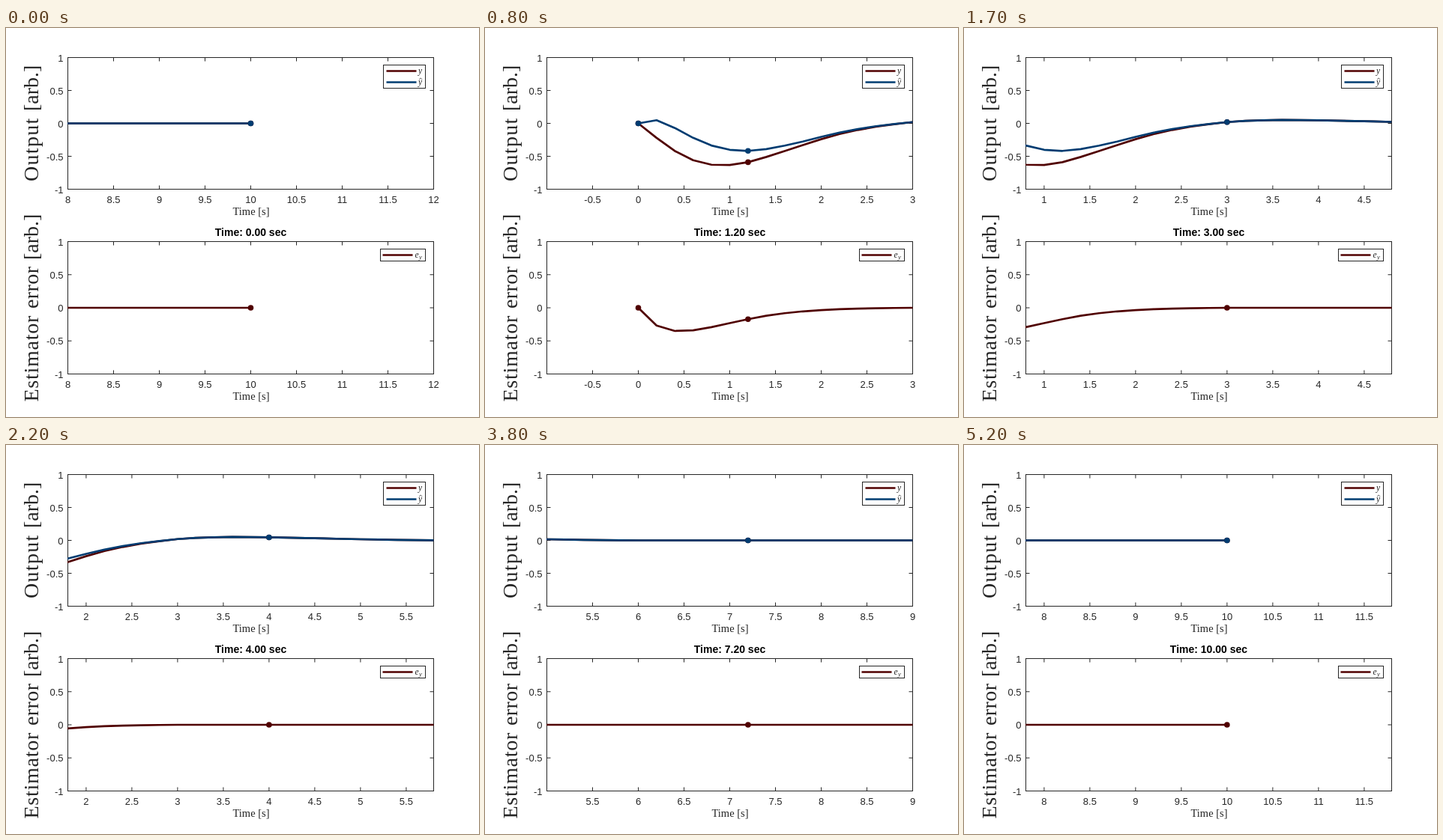
An HTML page that plays this animation: 631x520 px, repeating every 5.3 s.

```html
<!DOCTYPE html>
<html lang="en">
<head>
<meta charset="utf-8">
<title>Estimator response</title>
<style>
html, body { margin: 0; width: 100%; height: 100%; overflow: hidden; background: #fff; }
svg { display: block; width: 631px; height: 520px; }
.tick { font: 13px "Liberation Sans", Arial, sans-serif; fill: #262626; }
.title { font: bold 14px "Liberation Sans", Arial, sans-serif; fill: #000; }
.tex { font-family: "Liberation Serif", "Times New Roman", serif; fill: #262626; }
.var { font-style: italic; font-size: 11.5px; }
.axis { fill: none; stroke: #262626; stroke-width: 1; }
.curve { fill: none; stroke-width: 2.7; stroke-linejoin: round; }
</style>
</head>
<body>
<svg id="stage" viewBox="0 0 631 520"></svg>
<script>
const RED = '#500000', BLUE = '#003c71';
const LEFT = 82.5, RIGHT = 570.5, SPAN = 4, DT = 0.2, END = 10;
const STEP_MS = 100, STEPS = 53;
const stage = document.getElementById('stage');

function add(parent, tag, attrs, text) {
  const el = document.createElementNS('http://www.w3.org/2000/svg', tag);
  for (const k in attrs) el.setAttribute(k, attrs[k]);
  if (text !== undefined) el.textContent = text;
  parent.appendChild(el);
  return el;
}

// Sampled signals, one value per DT; zero afterwards
const out = [0, -.22, -.42, -.56, -.628, -.633, -.59, -.51, -.42, -.33, -.24, -.162, -.1, -.05, -.012,
  .02, .038, .048, .052, .05, .046, .041, .035, .029, .023, .017, .012, .008, .005, .002];
const err = [0, -.268, -.35, -.34, -.292, -.232, -.172, -.12, -.082, -.054, -.035, -.022, -.013, -.007, -.003];
const at = (list, i) => list[i] || 0;
const y = i => at(out, i);
const e = i => at(err, i);
const yHat = i => y(i) - e(i);

const defs = add(stage, 'defs', {});

function makePlot(top, bottom, signals, id) {
  const mid = (top + bottom) / 2, unit = (bottom - top) / 2;
  const clip = add(defs, 'clipPath', { id });
  add(clip, 'rect', { x: LEFT - .5, y: top, width: RIGHT - LEFT + .5, height: bottom - top });
  add(stage, 'rect', { class: 'axis', x: LEFT, y: top, width: RIGHT - LEFT, height: bottom - top });
  let d = '';
  for (let v = -1; v <= 1; v += .5) {
    const py = mid - v * unit;
    d += `M${LEFT} ${py}h5M${RIGHT} ${py}h-5`;
    add(stage, 'text', { class: 'tick', x: 76.5, y: py + 5, 'text-anchor': 'end' }, v);
  }
  add(stage, 'path', { class: 'axis', d });
  add(stage, 'text', { class: 'tex', x: 327, y: bottom + 34.5, 'font-size': 14.5, 'text-anchor': 'middle' }, 'Time [s]');
  const ticks = add(stage, 'path', { class: 'axis' });
  const labels = Array.from({ length: 9 }, () =>
    add(stage, 'text', { class: 'tick', y: bottom + 18.5, 'text-anchor': 'middle' }));
  const curves = signals.map(s =>
    add(stage, 'path', { class: 'curve', stroke: s.color, 'clip-path': `url(#${id})` }));
  const dots = signals.map(s => [0, 1].map(() => add(stage, 'circle', { r: 3.8, fill: s.color })));

  return function update(center, now) {
    const lo = center - SPAN / 2;
    const px = t => LEFT + (t - lo) * (RIGHT - LEFT) / SPAN;
    const first = Math.ceil(lo * 2 - 1e-6) / 2;
    const showFirst = first - lo > 1e-6 || [0, 2, 10].includes(Math.round(center * 10) / 10);
    let marks = '';
    labels.forEach((label, i) => {
      const t = first + i / 2;
      const on = t <= lo + SPAN + 1e-6 && (i > 0 || showFirst);
      label.textContent = on ? String(t + 0) : '';
      if (!on) return;
      label.setAttribute('x', px(t));
      marks += `M${px(t)} ${top}v5M${px(t)} ${bottom}v-5`;
    });
    ticks.setAttribute('d', marks);
    signals.forEach((s, k) => {
      const pts = [];
      for (let i = 0; i <= END / DT; i++) {
        pts.push(px(i * DT).toFixed(2) + ' ' + (mid - s.f(i) * unit).toFixed(2));
      }
      curves[k].setAttribute('d', 'M' + pts.join('L'));
      [0, now].forEach((t, j) => {
        const dot = dots[k][j], x = px(t);
        const seen = x > LEFT - .1 && x < RIGHT + .1;
        dot.setAttribute('visibility', seen ? 'visible' : 'hidden');
        dot.setAttribute('cx', x);
        dot.setAttribute('cy', mid - s.f(Math.round(t / DT)) * unit);
      });
    });
  };
}

const plots = [
  makePlot(39.5, 215.5, [{ f: y, color: RED }, { f: yHat, color: BLUE }], 'clipA'),
  makePlot(285.5, 462.5, [{ f: e, color: RED }], 'clipB')
];
const title = add(stage, 'text', { class: 'title', x: 326.5, y: 278, 'text-anchor': 'middle' });

// Vertical axis names, set word by word
[['Output', 205, 1.3], ['[arb.]', 111, 0],
 ['Estimator', 499.5, .75], ['error', 375, .4], ['[arb.]', 310, 0]].forEach(([word, py, gap]) =>
  add(stage, 'text', {
    class: 'tex', 'font-size': 28, 'letter-spacing': gap, transform: `translate(42.5 ${py}) rotate(-90)`
  }, word));

function legendBox(x, top, width, height) {
  add(stage, 'rect', { x, y: top, width, height, fill: '#fff', stroke: '#262626' });
}
function legendLine(x, py, color) {
  add(stage, 'path', { class: 'curve', stroke: color, d: `M${x} ${py}h40` });
}
const variable = (x, py, text) => add(stage, 'text', { class: 'tex var', x, y: py }, text);

legendBox(503.5, 49.5, 56, 31);
legendLine(507.5, 57.5, RED);
legendLine(507.5, 72.5, BLUE);
variable(550, 61, 'y');
variable(550, 76, 'y');
add(stage, 'path', { d: 'M551.2 69l2-2.2l2 2.2', fill: 'none', stroke: '#262626', 'stroke-width': .7 });
legendBox(499.5, 295.5, 60, 16);
legendLine(502.5, 303.5, RED);
variable(545.5, 306.5, 'e');
variable(551, 308.5, 'y').style.fontSize = '8.5px';

function render(ms) {
  const n = Math.floor(ms / STEP_MS) % STEPS;
  const time = Math.max(0, (n - 2) * DT);
  const center = n < 2 ? END : Math.max(0, (n - 3) * DT);
  const dot = n === 0 ? END : time;
  plots.forEach(update => update(center, dot));
  title.textContent = `Time: ${time.toFixed(2)} sec`;
}

let start = null;
function loop(now) {
  if (start === null) start = now;
  render(now - start);
  requestAnimationFrame(loop);
}
render(0);
requestAnimationFrame(loop);
</script>
</body>
</html>
```
